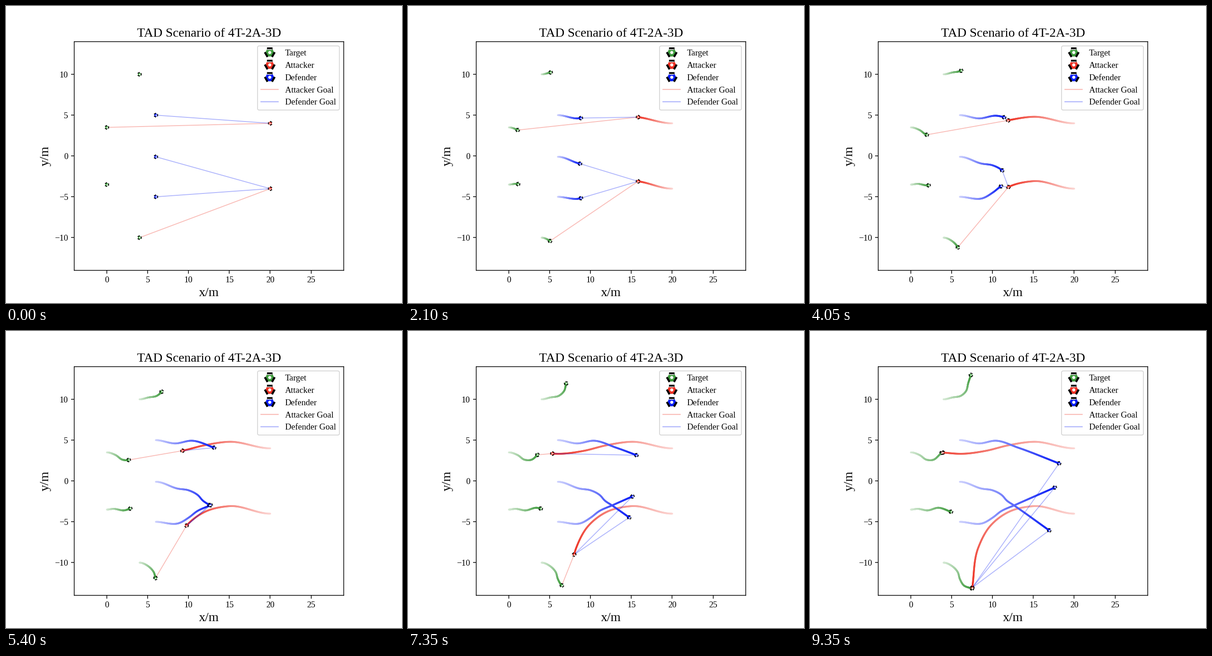
Animation of 864 by 648 pixels, one loop 9400 ms. Source, as a matplotlib script:

```python
import numpy as np
import matplotlib.pyplot as plt
from matplotlib.animation import FuncAnimation
from matplotlib.collections import LineCollection, PolyCollection
from matplotlib.lines import Line2D
from matplotlib.path import Path

plt.rcParams["font.family"] = "Liberation Serif"
plt.rcParams["path.snap"] = False

FRAMES, STEP = 188, 50
LAST = FRAMES - 1
CAPTURE = 161                      # first attacker reaches its target
GREEN, RED, BLUE = "#3f9c3e", "#ee3224", "#0a1ef7"
GREY = "#c8c8c8"
DPI = 135
PT = 72 / DPI                      # points per pixel
ICON = 0.0235                      # icon units to metres
METRE = 17.82                      # pixels per metre


def travel(points, arrive=LAST):
    """Constant-speed run along a curve that starts out level; one spot per frame."""
    p = np.array(points, float)
    s = np.append(0, np.cumsum(np.hypot(*np.diff(p, axis=0).T)))
    slope = np.gradient(p, s, axis=0)
    slope[0] = np.sign(p[1, 0] - p[0, 0]), 0
    q = np.linspace(0, s[-1], 800)
    k = np.clip(np.searchsorted(s, q, side="right") - 1, 0, len(s) - 2)
    h = (s[k + 1] - s[k])[:, None]
    u = (q - s[k])[:, None] / h
    curve = ((1 + 2 * u) * (1 - u) ** 2 * p[k] + u * (1 - u) ** 2 * h * slope[k]
             + u * u * (3 - 2 * u) * p[k + 1] + u * u * (u - 1) * h * slope[k + 1])
    arc = np.append(0, np.cumsum(np.hypot(*np.diff(curve, axis=0).T)))
    along = arc[-1] * np.minimum(np.arange(FRAMES) / arrive, 1)
    return np.column_stack([np.interp(along, arc, c) for c in curve.T])


targets = [
    travel([(4, 10), (5.1, 10.23), (6.14, 10.44), (6.75, 11), (7.03, 12), (7.35, 12.98)]),
    travel([(0, 3.5), (1.06, 3.18), (1.93, 2.6), (2.66, 2.57), (3.77, 3.46)], CAPTURE),
    travel([(0, -3.5), (0.8, -3.41), (2.05, -3.6), (3.35, -3.28), (4.91, -3.77)]),
    travel([(4, -10), (5.02, -10.4), (5.75, -11.18), (6, -12), (6.48, -12.78),
            (7.49, -13.17)]),
]
attackers = [
    travel([(20, 4), (15, 4.8), (11.9, 4.36), (9.17, 3.69), (6.2, 3.33), (3.91, 3.48)],
           CAPTURE),
    travel([(20, -4), (15, -3.08), (11.95, -3.8), (9.76, -5.46), (8.25, -8.18),
            (7.52, -13.06)]),
]
defenders = [
    travel([(6, 5), (8.4, 4.6), (10.4, 4.93), (13.13, 4.08), (18.15, 2.15)]),
    travel([(6, -0.1), (8.7, -0.94), (10, -1.14), (11.16, -1.75), (11.75, -2.4),
            (12.57, -2.95), (16.94, -6.05)]),
    travel([(6, -5), (8.86, -5.15), (10.07, -4.45), (11.02, -3.72), (12.71, -2.96),
            (17.62, -0.8)]),
]
paths = np.array(targets + attackers + defenders)
colors = [GREEN] * 4 + [RED] * 2 + [BLUE] * 3
T2, T4, A1, A2, D1, D2, D3 = 1, 3, 4, 5, 6, 7, 8

step = np.gradient(paths, axis=1)
headings = np.arctan2(step[..., 1], step[..., 0])
for agent in (T2, A1):
    headings[agent, CAPTURE:] = headings[agent, CAPTURE - 1]


def bar(angle, r, half, thick):
    """Rectangle lying across the direction given by angle."""
    out = np.array([np.cos(angle), np.sin(angle)])
    side = np.array([-out[1], out[0]])
    return np.array([(r + a * thick) * out + b * half * side
                     for a, b in ((-1, -1), (-1, 1), (1, 1), (1, -1))])


def wheels(heading):
    return [bar(heading + i * 2 * np.pi / 3, 9, 6, 2.2) for i in range(3)]


def front(heading):
    return bar(heading, 6, 4.6, 0.8)


def rgb(color):
    return np.array([int(color[i:i + 2], 16) for i in (1, 3, 5)]) / 255


fig, ax = plt.subplots(figsize=(864 / DPI, 648 / DPI), dpi=DPI)
ax.set_aspect("equal")
ax.set_xlim(-4, 29)
ax.set_ylim(-14, 14)
ax.set_xticks(range(0, 26, 5))
ax.set_yticks(range(-10, 11, 5))
ax.set_title("TAD Scenario of 4T-2A-3D", fontsize=15)
ax.set_xlabel("x/m", fontsize=15)
ax.set_ylabel("y/m", fontsize=15)

trails = [LineCollection([], linewidths=2.1, capstyle="round", zorder=2)
          for _ in colors]
goals = LineCollection([], linewidths=1, zorder=3, alpha=0.32,
                       colors=[RED] * 2 + [BLUE] * 3)
parts = PolyCollection([], facecolors=["k", "k", "k", GREY], linewidths=0, zorder=4.2)
for item in trails + [goals, parts]:
    ax.add_collection(item, autolim=False)


def discs(radius, color, z):
    size = 2 * radius * ICON * METRE * PT
    return ax.scatter(*paths[:, 0].T, s=size ** 2, c=color, linewidths=0, zorder=z)


bodies = discs(8, colors, 4)
holes = discs(3.4, "w", 4.4)


def dot(color, marker, radius):
    return Line2D([], [], ls="", marker=marker, ms=2 * radius * PT,
                  mfc=color, mec="none", mew=0)


def shape_dot(color, shapes):
    path = Path.make_compound_path(
        *[Path(np.vstack([s, s[:1]]), closed=True) for s in shapes])
    return dot(color, path, np.abs(shapes).max())


def icon(color):
    up = np.pi / 2
    return (dot(color, "o", 8.8), shape_dot("k", wheels(up)),
            shape_dot(GREY, [front(up)]), dot("w", "o", 3.4))


def goal_key(color):
    return Line2D([], [], color=color, lw=1.2, alpha=0.32)


ax.legend([icon(GREEN), icon(RED), icon(BLUE), goal_key(RED), goal_key(BLUE)],
          ["Target", "Attacker", "Defender", "Attacker Goal", "Defender Goal"],
          loc="upper right", fontsize=10, labelspacing=0.523)


def update(n):
    now = paths[:, n]
    fade = 0.2 + 0.8 * np.arange(n)[:, None] / max(n, 1)
    for trail, path, color in zip(trails, paths, colors):
        trail.set_visible(n > 0)
        if n:
            trail.set_segments(np.stack([path[:n], path[1:n + 1]], axis=1))
            trail.set_color(1 - fade * (1 - rgb(color)))

    prey = A1 if n < CAPTURE else A2
    pairs = [(A1, T2), (A2, T4), (D1, prey), (D2, A2), (D3, A2)]
    goals.set_segments([now[list(pair)] for pair in pairs])

    parts.set_verts([now[i] + ICON * shape
                     for i, a in enumerate(headings[:, n])
                     for shape in wheels(a) + [front(a)]])
    bodies.set_offsets(now)
    holes.set_offsets(now)
    return trails + [goals, parts, bodies, holes]


anim = FuncAnimation(fig, update, frames=FRAMES, interval=STEP,
                     init_func=lambda: update(0), repeat=True, repeat_delay=0)
plt.show()
```
